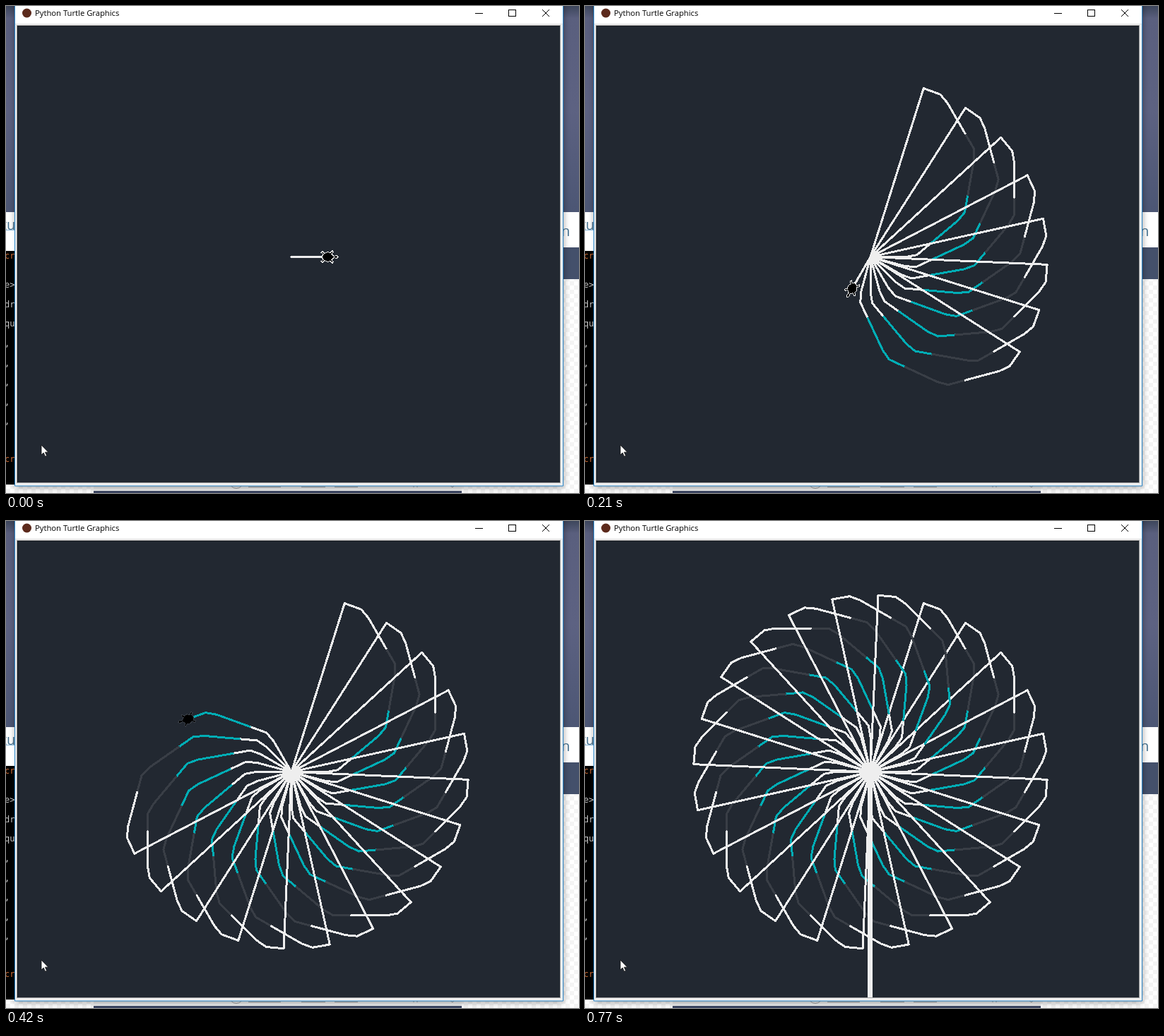
Animation, 811 px wide and 690 px high, one loop 1770 ms. Source, as an HTML page:

```html
<!DOCTYPE html>
<html lang="en">
<head>
<meta charset="utf-8">
<title>Turtle flower</title>
<style>
  html, body { margin: 0; width: 100%; height: 100%; overflow: hidden; background: #fff; }
  svg { display: block; }
  .code { font: 12px "DejaVu Sans Mono", monospace; fill: #c8c8c8; }
  .code .tag { fill: #cc6a33; }
  .page { font: 20px "Open Sans", sans-serif; fill: #44708f; }
  .title { font: 11.25px "Open Sans", sans-serif; fill: #000; }
  .pen { fill: none; stroke-linecap: round; stroke-linejoin: round; shape-rendering: crispEdges; }
</style>
</head>
<body>
<svg width="811" height="690" viewBox="0 0 811 690">
  <defs>
    <linearGradient id="sky" x2="0" y2="1">
      <stop offset="0" stop-color="#3d465c"/>
      <stop offset=".06" stop-color="#5a5f7e"/>
      <stop offset=".5" stop-color="#5d6282"/>
      <stop offset="1" stop-color="#4c5674"/>
    </linearGradient>
    <pattern id="check" width="12" height="12" patternUnits="userSpaceOnUse">
      <path d="M0 0h6v6h-6zM6 6h6v6h-6z" fill="#f4f4f4"/>
    </pattern>
    <filter id="soft" x="-5%" y="-5%" width="110%" height="110%"><feGaussianBlur stdDeviation="5"/></filter>
    <clipPath id="leftTab"><path d="M0 292h13v25h-13z"/></clipPath>
    <clipPath id="canvas"><path d="M17 29h767v646h-767z"/></clipPath>
  </defs>

  <!-- Pages behind the window -->
  <path d="M0 0h811v690h-811z" fill="#fff"/>
  <path d="M0 387h811v303h-811z" fill="url(#check)"/>
  <path d="M0 0h811v292h-811z" fill="url(#sky)"/>
  <path d="M700 342h111v45h-111z" fill="#44506b"/>
  <text class="page" x="786" y="326">n</text>
  <text class="page" x="-6" y="317" clip-path="url(#leftTab)">tu</text>
  <path d="M124 670h521v20h-521z" fill="#f1f1f1"/>
  <path d="M124 687h521v3h-521z" fill="#3d4763"/>
  <g fill="none" stroke="#a0a0a0">
    <circle cx="326" cy="674" r="9.5"/>
    <path d="M343 681.5h46M418 681.5h34M465 681.5h33M577 679v3M582 679v3M628 679l4 3 3-3"/>
  </g>
  <rect x="13" y="-10" width="776" height="692" fill="#000" opacity=".4" filter="url(#soft)"/>
  <path d="M0 317h13v30h-13z" fill="#fff"/>
  <path d="M0 317.5h13" stroke="#86b4d6"/>
  <path d="M0 347h13v331h-13z" fill="#000"/>
  <g class="code" id="code"></g>

  <!-- Window -->
  <path d="M12.5 -2h776v682h-776z" fill="#f0f0f0" stroke="#2b86c9"/>
  <path d="M13 0h775v25h-775z" fill="#fff"/>
  <path d="M13 25.5h775" stroke="#e3e3e3"/>
  <circle cx="29.5" cy="10" r="6.5" fill="#5c2a1c"/>
  <text class="title" x="41" y="14">Python Turtle Graphics</text>
  <g fill="none" stroke="#000">
    <path d="M664 10.5h11M711.5 5.5h10v9h-10z" shape-rendering="crispEdges"/>
    <path d="M759 5l10 10M769 5l-10 10"/>
  </g>
  <path d="M15 27h770v649h-770z" fill="#a0a0a0"/>
  <path d="M16 28h768v647h-768z" fill="#14181e"/>
  <path d="M17 29h767v646h-767z" fill="#222831"/>
  <g clip-path="url(#canvas)">
    <g id="now"></g>
    <g id="next"></g>
  </g>
  <path d="M50 622v14l3.2-3 2.3 5.2 2.2-1-2.3-5h4.4z" fill="#fff" stroke="#111" stroke-width=".8"/>
</svg>
<script>
const $ = id => document.getElementById(id);
const WHITE = "#eeeeee", TEAL = "#00adb5", GRAY = "#393e46", BACK = "#222831";
const INKS = [WHITE, TEAL, GRAY, WHITE];
const LENGTHS = [50, 16, 25], TURNS = [0, 10, 40];
const CX = 404, CY = 355.5;
const PER_PETAL = 13, PETALS = 24;

const TICK = 70, LOOP = 1770;
// strokes drawn at each tick, then a fade to a later stage
const COUNTS = [1, 34, 67, 105, 143, 179, 214, 248];
const FADE_TO = 22 * PER_PETAL, FADES = [0.35, 0.68];

const HALF = [[16, 0], [14, 2], [10, 1], [7, 4], [9, 7], [8, 9], [5, 6], [1, 7],
              [-3, 5], [-6, 8], [-8, 6], [-5, 4], [-7, 0]];
const SHELL = [...HALF, ...HALF.slice(1, -1).reverse().map(([x, y]) => [x, -y])].join(" ");

const pad = n => n.toFixed(2);

function turtle(x, y, heading, ink) {
  return `<polygon points="${SHELL}" fill="#000" stroke="${ink}" shape-rendering="crispEdges"
    transform="translate(${pad(x)} ${pad(y)}) rotate(${-heading})"/>`;
}

function drawing(strokes, withTurtle = true) {
  let x = CX, y = CY, out = "", path = "", ink = WHITE;
  const flush = () => {
    if (path) out += `<path class="pen" stroke="${ink}" stroke-width="3" d="${path}"/>`;
    path = "";
  };
  for (let i = 0; i < strokes; i++) {
    const step = i % PER_PETAL, petal = Math.floor(i / PER_PETAL);
    if (step % 3 === 0) {
      flush();
      ink = step < 12 ? INKS[step / 3] : WHITE;
      path = `M${pad(x)} ${pad(y)}`;
    }
    if (step === 12) {
      x = CX;
      y = CY;
    } else {
      const angle = (-15 * petal + 40 * Math.floor(step / 3) + TURNS[step % 3]) * Math.PI / 180;
      x += LENGTHS[step % 3] * Math.cos(angle);
      y -= LENGTHS[step % 3] * Math.sin(angle);
    }
    path += `L${pad(x)} ${pad(y)}`;
  }
  flush();
  if (!withTurtle) return out;
  const step = strokes % PER_PETAL, petal = Math.floor(strokes / PER_PETAL);
  const heading = step === 0
    ? 160 - 15 * (petal - 1)
    : -15 * petal + 40 * Math.floor((step + 1) / 3);
  return out + turtle(x, y, heading, INKS[Math.floor(step / 3)] || WHITE);
}

function show(tick) {
  const fade = FADES[tick - COUNTS.length];
  const last = COUNTS.length - 1;
  let scene;
  if (tick > last + FADES.length + 1) {
    scene = drawing(PETALS * PER_PETAL, false) +
      `<path class="pen" stroke="${WHITE}" stroke-width="7" d="M403.5 ${CY}V700"/>`;
  } else if (tick > last + FADES.length) {
    scene = drawing(FADE_TO);
  } else {
    scene = drawing(COUNTS[Math.min(tick, last)]);
  }
  $("now").innerHTML = scene;
  $("next").innerHTML = fade ? `<path d="M17 29h767v646h-767z" fill="${BACK}"/>` + drawing(FADE_TO) : "";
  $("next").setAttribute("opacity", fade || 0);
}

const CODE = [["cr", 358], ["e&gt;", 399], ["dr", 427], ["qu", 454], [",", 482],
              [",", 510], [",", 537], [",", 565], [",", 592], ["cr", 646]];
$("code").innerHTML = CODE.map(([text, y]) =>
  `<text x="-2" y="${y}" ${text === "cr" ? 'class="tag"' : ""}>${text}</text>`).join("");

const start = performance.now();
let shown = -1;
function frame() {
  const time = (performance.now() - start) % LOOP;
  const tick = Math.min(11, Math.floor(time / TICK));
  if (tick !== shown) show(shown = tick);
  requestAnimationFrame(frame);
}
frame();
</script>
</body>
</html>
```
